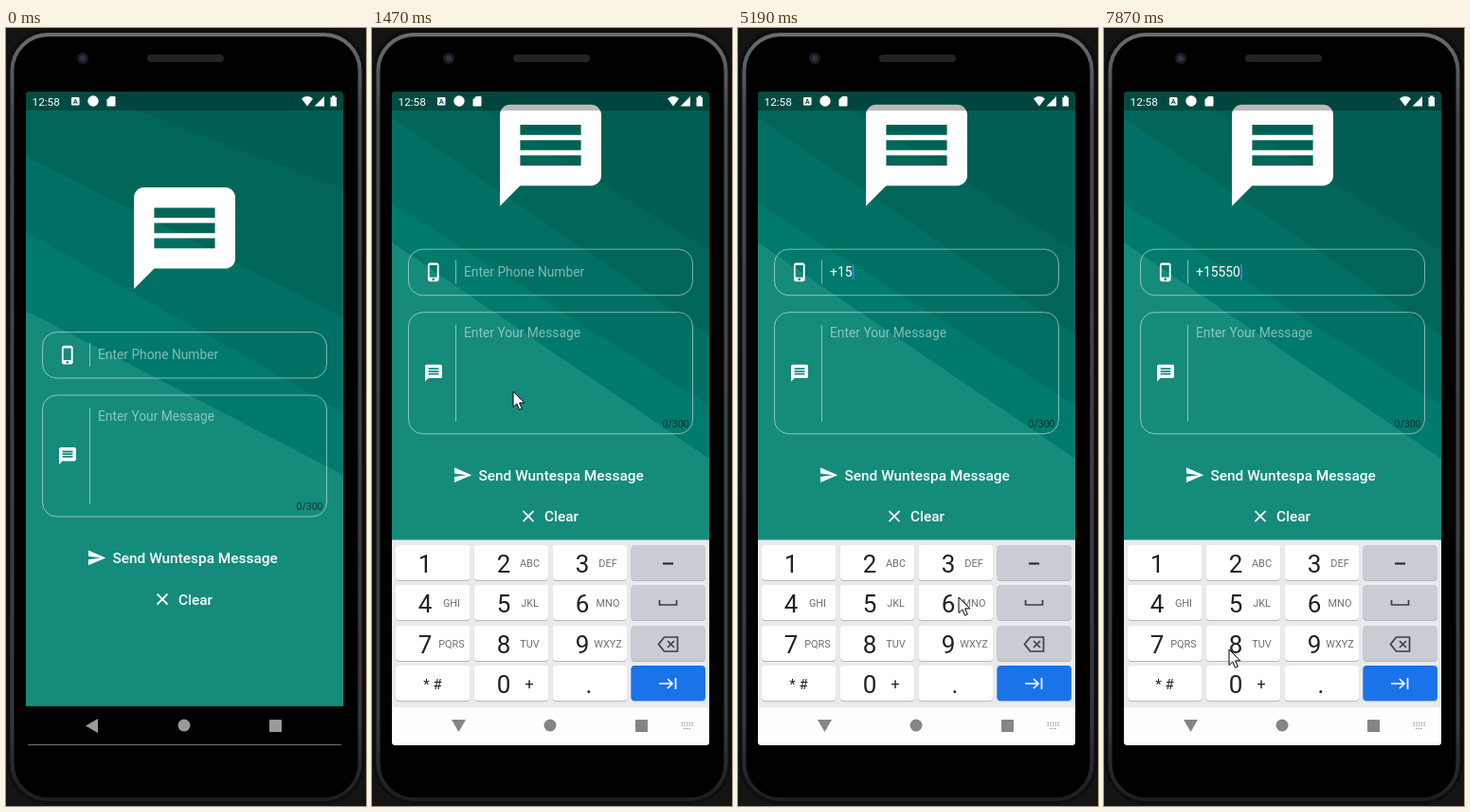
An HTML page for the animation above (8 s loop, 380 px wide and 820 px high).

```html
<!DOCTYPE html>
<html lang="en">
<head>
<meta charset="utf-8">
<title>Message sender</title>
<style>
html, body { margin: 0; width: 100%; height: 100%; overflow: hidden; background: #141414; }
svg { display: block; width: 380px; height: 820px; font-family: Roboto, sans-serif; }
.hint { font-size: 13.8px; fill: #fff; opacity: .5; }
.action { font-size: 15.4px; font-weight: 500; fill: #fff; }
.line { fill: none; stroke: #fff; stroke-opacity: .5; }
.digit { font-size: 26px; fill: #202124; text-anchor: middle; }
.letters { font-size: 10.9px; fill: #6b6f73; text-anchor: middle; }
.glyph { fill: none; stroke: #3c4043; stroke-width: 1.7; }
</style>
</head>
<body>
<svg viewBox="0 0 380 820">
  <defs>
    <linearGradient id="metal" x2="0" y2="1">
      <stop offset="0" stop-color="#6a6c6e"/><stop offset=".1" stop-color="#45474a"/>
      <stop offset=".9" stop-color="#36383a"/><stop offset="1" stop-color="#1c1d1e"/>
    </linearGradient>
    <clipPath id="screen"><rect x="21" y="67" width="335" height="689" rx="4"/></clipPath>
    <clipPath id="page"><rect x="21" y="67" width="335" height="647.5"/></clipPath>
    <path id="message" d="M20 2H4c-1.1 0-1.99.9-1.99 2L2 22l4-4h14c1.1 0 2-.9 2-2V4c0-1.1-.9-2-2-2zm-2 12H6v-2h12v2zm0-3H6V9h12v2zm0-3H6V6h12v2z"/>
  </defs>

  <!-- phone body -->
  <rect x="1" y="1" width="378" height="817" rx="43" fill="#0e0e0f"/>
  <rect x="6.5" y="7" width="367" height="806" rx="38" stroke="url(#metal)" stroke-width="4"/>
  <circle cx="81" cy="32" r="6" fill="#1b1d22"/><circle cx="81" cy="32" r="3" fill="#2d3446"/>
  <rect x="149" y="28" width="81" height="8" rx="4" fill="#222324"/>

  <g clip-path="url(#screen)">
    <rect x="21" y="67" width="335" height="689"/>
    <g clip-path="url(#page)">
      <rect x="21" y="67" width="335" height="648" fill="#005f54"/>
      <g id="bands"></g>
      <g id="content">
        <use href="#message" fill="#fff" transform="translate(124.3 157.3) scale(5.35)"/>
        <rect class="line" x="38.5" y="320.5" width="300" height="48.5" rx="15"/>
        <rect class="line" x="38.5" y="387" width="300" height="128" rx="15"/>
        <path class="line" d="M88.5 332v25M88.5 400v102"/>
        <path fill="#fff" transform="translate(54.4 333.8) scale(.9)" d="M15.5 1h-8C6.12 1 5 2.12 5 3.5v17C5 21.88 6.12 23 7.5 23h8c1.38 0 2.5-1.12 2.5-2.5v-17C18 2.12 16.88 1 15.5 1zm-4 21c-.83 0-1.5-.67-1.5-1.5s.67-1.5 1.5-1.5 1.5.67 1.5 1.5-.67 1.5-1.5 1.5zm4.5-4H7V4h9v14z"/>
        <use href="#message" fill="#fff" transform="translate(54.2 440.2) scale(.9)"/>
        <text id="hint" class="hint" x="97" y="349">Enter Phone Number</text>
        <text id="typed" x="97" y="349" font-size="13.9" fill="#fff"></text>
        <rect id="caret" y="336.5" width="1.8" height="16" fill="#3f7fe8"/>
        <text class="hint" x="97" y="413.5">Enter Your Message</text>
        <text x="306.5" y="508" font-size="10.5" fill-opacity=".6">0/300</text>
        <path fill="#fff" transform="translate(85.2 548) scale(.87)" d="M2 21L23 12 2 3v7l15 2-15 2z"/>
        <text class="action" x="112.5" y="564">Send Wuntespa Message</text>
        <path d="M159.5 596.5l11 11m0-11l-11 11" stroke="#fff" stroke-width="1.8"/>
        <text class="action" x="182" y="607.5">Clear</text>
      </g>
    </g>

    <!-- status bar -->
    <rect x="21" y="67" width="335" height="20" fill-opacity=".27"/>
    <g fill="#fff">
      <text x="27.5" y="81.5" font-size="11.8">12:58</text>
      <rect x="69" y="73" width="8.5" height="8.5" rx="1"/>
      <circle cx="92" cy="77" r="5.7"/>
      <path d="M110 72h4.5q1 0 1 1v8.5q0 1-1 1h-7q-1 0-1-1v-6z"/>
      <path d="M312 74.5q6-4.8 12 0L318 82.5zM336 72v10.5h-10.5z"/>
      <path d="M344 73v-1.5h3.5v1.5h1.5v9.5h-6.5v-9.5z"/>
    </g>
    <text x="73.2" y="80" font-size="7.5" font-weight="700" text-anchor="middle" fill="#00584d">A</text>

    <g id="keyboard">
      <rect x="21" y="539.5" width="335" height="220" fill="#e8eaed"/>
      <rect x="21" y="716" width="335" height="45" fill="#fefefe"/>
      <g id="keys"></g>
      <path class="glyph" style="stroke:#202124;stroke-width:2" d="M307 564.5h11"/>
      <path class="glyph" d="M303.5 603v5h18v-5M308.5 642h14v15h-14l-6-7.5zM312 646l7 7m0-7l-7 7"/>
      <path class="glyph" style="stroke:#fff" d="M303 691h14m-5-5l5 5l-5 5M320.5 685v12"/>
    </g>

    <!-- navigation bar -->
    <g id="nav">
      <path id="back" d="M84 735.5l13-7.5v15z"/>
      <circle cx="188" cy="735" r="6.5"/>
      <rect x="278" y="729" width="13" height="13" rx="1"/>
      <path id="switcher" fill="none" stroke="#999" stroke-width="1.3" stroke-dasharray="1.5 1.2" d="M326.5 732.5h13M326.5 735.2h13M329 738.3h8"/>
    </g>
  </g>
  <path id="pointer" d="M0 0v16.5l3.8-3.6 2.7 6.3 2.8-1.2-2.7-6.1h5.2z" fill="#fff" stroke="#000" stroke-width="1"/>
</svg>
<script>
const $ = id => document.getElementById(id);
const LOOP = 8000, SHIFT = 87.3;

// Bursts of screen updates: first time, last time, count
const bursts = [[370, 610, 3], [980, 980, 1], [1230, 1930, 7], [2040, 2630, 6], [2880, 3120, 3],
  [3490, 3980, 5], [4350, 5070, 7], [5190, 5920, 7], [6040, 6400, 4], [6890, 7500, 6], [7750, 7870, 2]];

// Each row: time, values...
const pointerPath = [[370, 75, 366], [610, 123, 345], [1230, 123, 345], [1463, 149, 383], [1930, 205, 560],
  [2040, 214, 605], [2510, 171, 682], [3400, 171, 682], [3980, 53, 556], [4400, 53, 556], [5070, 233, 600],
  [5250, 233, 600], [5800, 133, 562], [6000, 133, 562], [6400, 231, 599], [6950, 231, 599], [7500, 132, 655]];
// keyboard offset, page shift, back button angle
const opening = [[980, 216, 0, 0], [1230, 54, 52, -12], [1346, 7, 83, -62], [1463, 0, SHIFT, -90]];

const typing = [[970, ""], [2980, "+"], [4350, "+1"], [5190, "+15"], [5900, "+155"], [7000, "+1555"], [7860, "+15550"]];
const presses = [[2630, 2980, "0"], [6890, 7000, "6"], [7750, 7860, "8"]];

// colour, then left and right heights with the keyboard closed and open
const bands = [["#006659", 42, 170, 25, 235], ["#007064", 135, 305, 95, 324],
  ["#007a6c", 215, 405, 185, 398], ["#158b7c", 298, 471, 226, 454]];

const keyRows = [["1", "2 ABC", "3 DEF", ""], ["4 GHI", "5 JKL", "6 MNO", ""],
  ["7 PQRS", "8 TUV", "9 WXYZ", ""], ["*", "0 +", ".", ""]];
const keyRects = {};

function add(parent, tag, attrs, text = "") {
  const el = document.createElementNS("http://www.w3.org/2000/svg", tag);
  for (const k in attrs) el.setAttribute(k, attrs[k]);
  el.textContent = text;
  return parent.appendChild(el);
}

keyRows.forEach((row, r) => row.forEach((label, c) => {
  const x = 25 + c * 82.8, y = Math.round(545 + r * 42.4), width = 78.5, height = 37, mid = y + 19;
  const fill = c < 3 ? "#fff" : r < 3 ? "#c9ccd3" : "#1a73e8";
  add($("keys"), "rect", { x, y: y + 1, width, height, rx: 4, fill: "#b4b7bb" });
  const key = add($("keys"), "rect", { x, y, width, height, rx: 4, fill });
  const [digit, letters] = label.split(" ");
  keyRects[digit] = key;
  if (digit === "*") {
    add($("keys"), "text", { class: "digit", x: 64, y: mid + 6, style: "font-size:15px" }, "* #");
    return;
  }
  add($("keys"), "text", { class: "digit", x: digit === "." ? 229 : 56 + c * 83, y: mid + 10 }, digit);
  if (letters === "+") add($("keys"), "text", { class: "digit", x: 166, y: mid + 6, style: "font-size:16px" }, "+");
  else if (letters) add($("keys"), "text", { class: "letters", x: 84 + c * 82.5, y: mid + 4 }, letters);
}));

const bandPaths = bands.map(([fill]) => add($("bands"), "path", { fill }));

function snap(t) {
  let s = 0;
  for (const [a, b, n] of bursts) {
    if (t < a) break;
    const step = (b - a) / (n - 1) || 1;
    s = Math.min(b, a + Math.floor((t - a) / step + .1) * step);
  }
  return s;
}

function at(keys, t) {
  const i = keys.findIndex(k => k[0] > t);
  if (i === 0) return keys[0].slice(1);
  if (i < 0) return keys[keys.length - 1].slice(1);
  const a = keys[i - 1], b = keys[i], u = (t - a[0]) / (b[0] - a[0]);
  return a.slice(1).map((v, j) => v + (b[j + 1] - v) * u);
}

const show = (el, on) => el.setAttribute("visibility", on ? "visible" : "hidden");

function draw(t) {
  const s = snap(t);
  const [drop, shift, angle] = at(opening, s);
  const open = shift / SHIFT;

  $("content").setAttribute("transform", `translate(0 ${-shift})`);
  $("keyboard").setAttribute("transform", `translate(0 ${drop})`);
  $("back").setAttribute("transform", `rotate(${angle} 91 735)`);
  $("nav").setAttribute("fill", open ? "#858585" : "#9a9a9a");
  show($("switcher"), s >= 980);
  bands.forEach(([, l0, r0, l1, r1], i) => {
    const left = l0 + (l1 - l0) * open, right = r0 + (r1 - r0) * open;
    bandPaths[i].setAttribute("d", `M21 ${left}L356 ${right}V715H21z`);
  });

  const [since, text] = typing.filter(k => k[0] <= t).pop() || [LOOP, ""];
  $("typed").textContent = text;
  show($("hint"), !text);
  show($("caret"), t >= since && (t - since) % 1000 < 500);
  $("caret").setAttribute("x", 97.3 + text.length * 7.8);

  for (const [from, to, key] of presses)
    keyRects[key].setAttribute("fill", t >= from && t < to ? "#d5d8dc" : "#fff");

  show($("pointer"), s >= 370);
  $("pointer").setAttribute("transform", `translate(${at(pointerPath, s)})`);
}

function frame() {
  draw(performance.now() % LOOP);
  requestAnimationFrame(frame);
}
frame();
</script>
</body>
</html>
```
